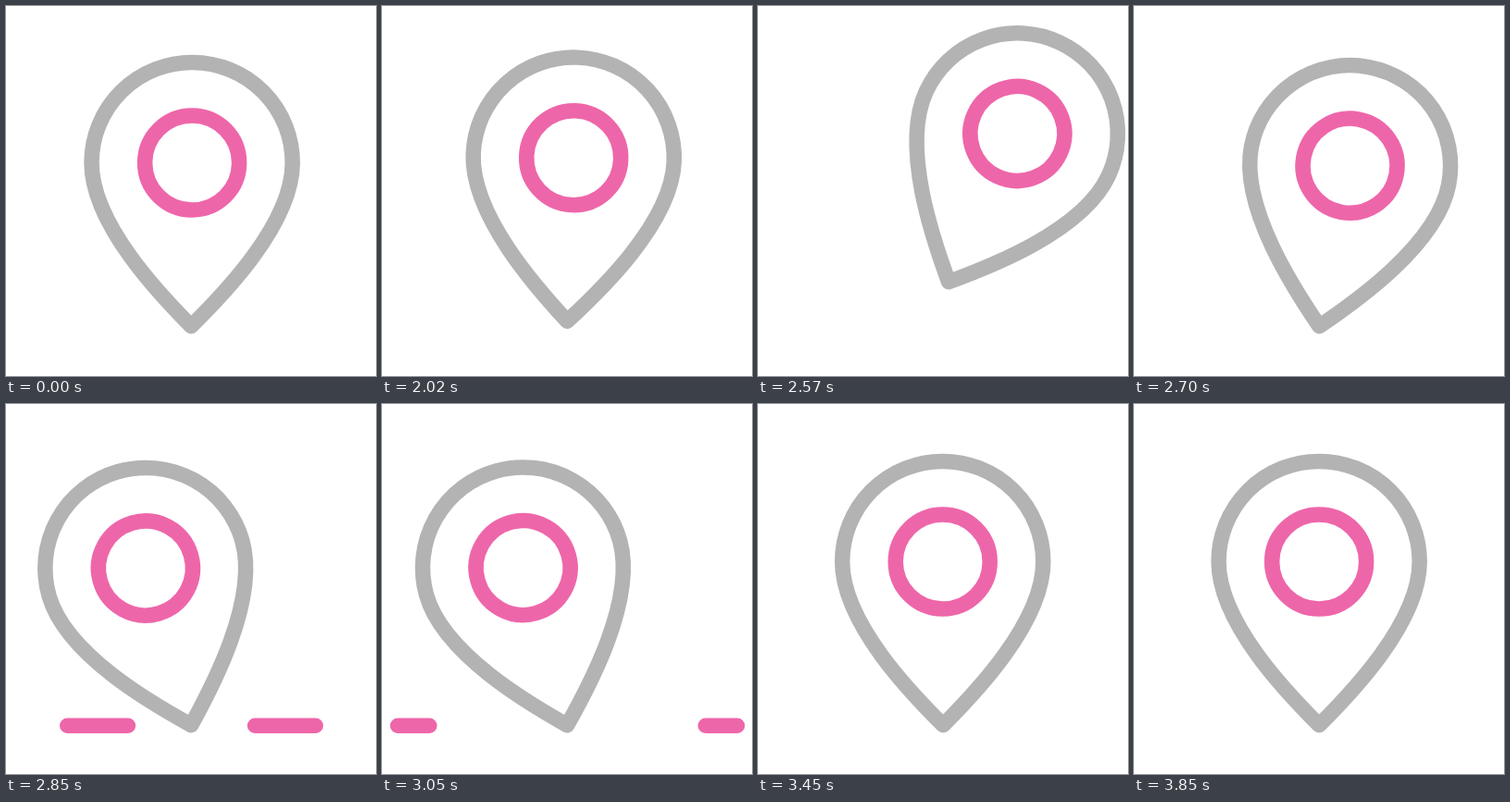
An HTML page that plays this animation: 400 by 400 pixels, repeating every 3.87 s.

```html
<!DOCTYPE html>
<html lang="en">
<head>
<meta charset="utf-8">
<title>Map pin</title>
<style>
  html, body { margin: 0; width: 100%; height: 100%; overflow: hidden; background: #fff; }
  svg { display: block; width: 100%; height: 100%; }
  svg * { fill: none; stroke-width: 16.5; stroke-linecap: round; stroke-linejoin: round; }
  .gray { stroke: #b3b3b3; }
  .pink { stroke: #ee66aa; }
</style>
</head>
<body>
<svg viewBox="0 0 400 400">
  <path id="dashes" class="pink"/>
  <!-- The pin's tip is the local origin. -->
  <g id="pin">
    <path class="gray" d="M0 0C-32 -32 -108.6 -110 -108.6 -176.7A108.6 108.6 0 0 1 108.6 -176.7C108.6 -110 32 -32 0 0Z"/>
    <circle class="pink" cy="-176.7" r="51"/>
  </g>
</svg>
<script>
  const LOOP = 3870, HOLD = 2020, STEP = 25;
  const TIP = { x: 200.2, y: 347.2 };
  const pin = document.getElementById('pin');
  const dashes = document.getElementById('dashes');

  const smooth = s => s * s * (3 - 2 * s);
  const out = p => s => 1 - (1 - s) ** p;

  // Each key: time, value, easing of the way to it (smooth by default)
  const ANGLE = [
    [HOLD, 2.27], [2500, 25, out(2.3)], [2557, 25], [2950, -25],
    [3240, 12.2], [3540, -4], [3860, 0]
  ];
  const LIFT = [[HOLD, 6.5], [2500, 66, out(2.8)], [2710, 0]];
  const DRIFT = [[HOLD, 0], [2500, 8, out(2.8)], [2710, 0]];
  const INNER = [[2705, 42], [3220, 188.5]];
  const OUTER = [[2705, 42], [3220, 188.5, out(3.13)]];

  function valueAt(keys, t) {
    const i = keys.findIndex(k => k[0] > t);
    if (i === 0) return keys[0][1];
    if (i < 0) return keys[keys.length - 1][1];
    const [t0, a] = keys[i - 1];
    const [t1, b, ease = smooth] = keys[i];
    return a + (b - a) * ease((t - t0) / (t1 - t0));
  }

  function placePin(angle, lift, drift) {
    pin.setAttribute('transform',
      `translate(${TIP.x + drift} ${TIP.y - lift}) rotate(${angle})`);
  }

  function drawDashes(t) {
    const visible = t > INNER[0][0] && t < INNER[1][0];
    const a = valueAt(INNER, t), b = valueAt(OUTER, t);
    const line = side => `M${200.5 + side * a} 347.75H${200.5 + side * b}`;
    dashes.setAttribute('d', visible ? line(-1) + line(1) : '');
  }

  function draw(time) {
    if (time < HOLD) {
      placePin(0.3, 1, 0);
      drawDashes(0);
      return;
    }
    const t = HOLD + STEP * Math.floor((time - HOLD) / STEP + 0.01);
    placePin(valueAt(ANGLE, t), valueAt(LIFT, t), valueAt(DRIFT, t));
    drawDashes(t);
  }

  const start = performance.now();
  function tick() {
    draw((performance.now() - start) % LOOP);
    requestAnimationFrame(tick);
  }
  tick();
</script>
</body>
</html>
```
